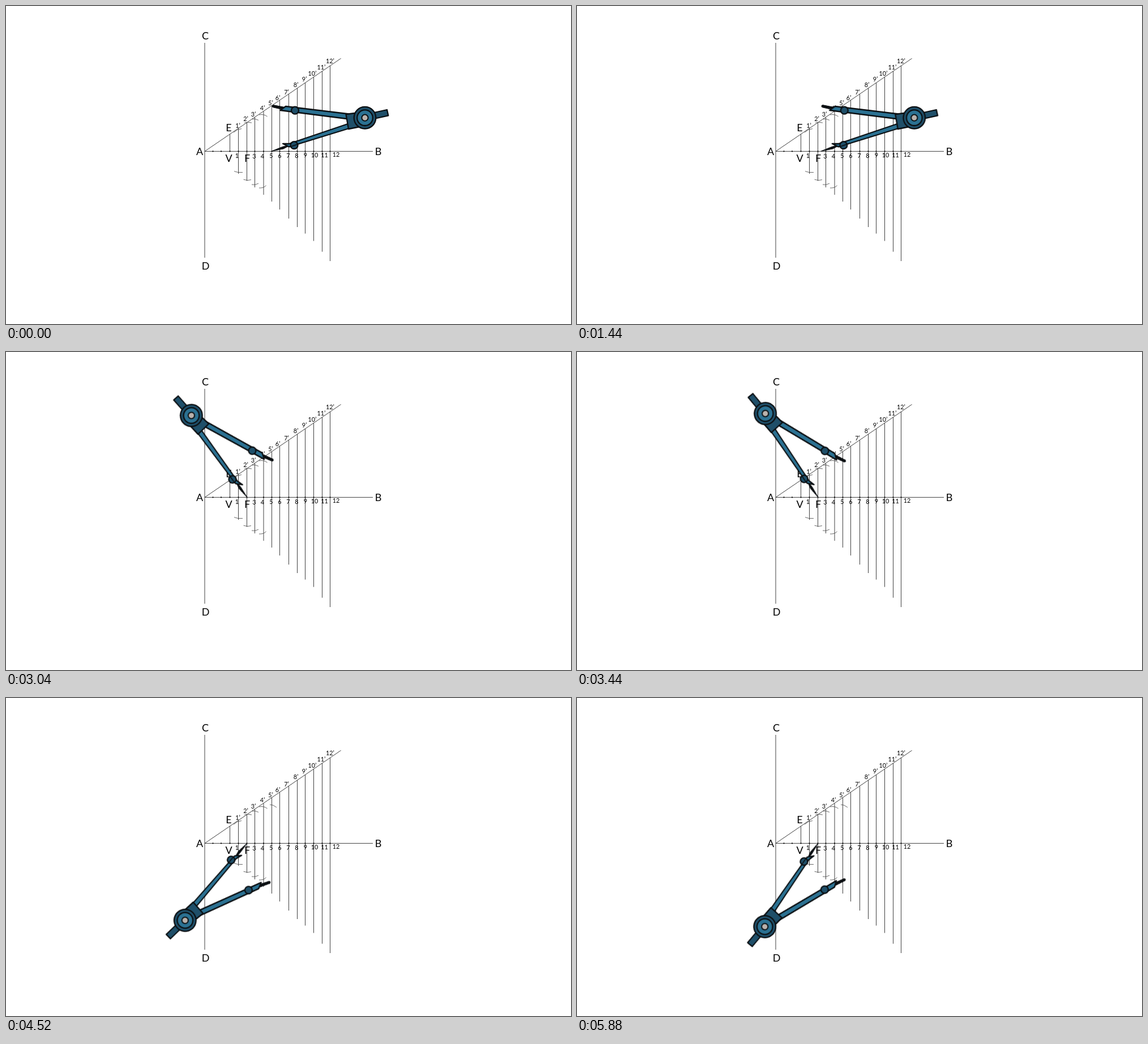
An HTML page for the animation above (5.92 s loop, 998 by 561 pixels).

```html
<!DOCTYPE html>
<html lang="en">
<head>
<meta charset="utf-8">
<title>Compass construction</title>
<style>
  html, body { margin: 0; width: 100%; height: 100%; overflow: hidden; background: #fff; }
  svg { display: block; width: 100vw; height: 100vh; }
  text { font-family: Lato, "Open Sans", sans-serif; text-anchor: middle; fill: #000; }
  .big { font-size: 18px; }
  .small { font-size: 10.8px; }
  .lines { fill: none; stroke: #2b2b2b; stroke-width: .9; }
  .arcs { fill: none; stroke: #444; stroke-width: .8; }

  #compass { stroke: #0b0f12; stroke-width: 2.3; stroke-linejoin: round; animation: move 5920ms linear infinite; }
  .dark { fill: #1f4f69; }
  .mid { fill: #2b7192; }
  .ink { fill: #0b0f12; stroke-width: 1; }
  #trace { animation: trace 5920ms step-end infinite; }

  /* slide to F, swing above the axis, swing below it */
  @keyframes move {
    0% { transform: translate(470px, 256px) scale(1, 1) rotate(0deg) scale(1, 1);
      animation-timing-function: cubic-bezier(.3333, 0, .6667, .3333); }
    16.554% { transform: translate(447.75px, 256px) scale(1, 1) rotate(0deg) scale(1, 1);
      animation-timing-function: cubic-bezier(.3333, .6667, .6667, 1); }
    33.108% { transform: translate(425.5px, 256px) scale(1, 1) rotate(0deg) scale(1, 1);
      animation-timing-function: step-end; }
    33.446% { transform: translate(425.5px, 256px) scale(1, 1) rotate(30.54deg) scale(-1, 1); }
    66.554% { transform: translate(425.5px, 256px) scale(1, 1) rotate(40.64deg) scale(-1, 1);
      animation-timing-function: step-end; }
    67.230% { transform: translate(425.5px, 256.5px) scale(1, -1) rotate(28.97deg) scale(-1, 1); }
    100% { transform: translate(425.5px, 256.5px) scale(1, -1) rotate(37.89deg) scale(-1, 1); }
  }
  @keyframes trace {
    0% { opacity: 0; }
    67.230%, 100% { opacity: 1; }
  }
</style>
</head>
<body>
<svg viewBox="0 0 998 561">
  <path class="lines" id="axes" d="M351 65V444M351 256.4H648M351 256.4L591.5 92.5M395.5 226V256"/>
  <path class="lines" id="bars"/>
  <g id="dots"/>
  <path class="arcs" d="M402 223Q408 217 416 216.5M421 206Q427 204.5 434 206M434 199.5Q440 198 446 201.5M447 192Q455 190 461.5 195
    M403 291.5Q409 294.5 418 293.5M419.5 306Q426 309 433 306.5M434 315Q440 316.5 446 313M447 321Q455 321.5 459.5 316.5"/>
  <path class="arcs" id="trace" d="M466 188Q472 188 478 193"/>
  <g id="labels"/>

  <g id="compass">
    <g transform="translate(-470 -256)">
      <path class="dark" d="M648 188.5L673 183L675.3 193.3L650 199Z"/>
      <path class="ink" d="M472 174.6L492 178.5L488 182.5L471 178.6Q468.5 176 472 174.6Z"/>
      <path class="mid" d="M484.5 184L494 177L606 190.5V199.5Z"/>
      <path class="ink" d="M469.5 256L488 248.5L506 243.5L490 252Z"/>
      <path class="mid" d="M489 242.8L500 243L608 206.5L609 215L500 248.5Z"/>
      <path class="dark" d="M600.5 191L624 188L630 212L605 217Z"/>
      <circle class="dark" cx="510.5" cy="184.2" r="6.5"/>
      <circle class="dark" cx="509" cy="245.7" r="6.5"/>
      <path d="M503 248L515 244" stroke-width="1.8"/>
      <circle class="dark" cx="634" cy="197.2" r="19.3"/>
      <circle class="mid" cx="634" cy="197.2" r="13.8"/>
      <circle cx="634" cy="197.2" r="5.6" fill="#b9b2ad" stroke-width="2"/>
    </g>
  </g>
</svg>
<script>
  const NS = 'http://www.w3.org/2000/svg';
  const $ = id => document.getElementById(id);

  function add(parent, tag, attrs, text) {
    const el = document.createElementNS(NS, tag);
    for (const key in attrs) el.setAttribute(key, attrs[key]);
    if (text) el.textContent = text;
    parent.appendChild(el);
  }

  // x, y is the middle of the capital or digit
  function label(text, x, y, size) {
    const drop = size === 'big' ? 6.5 : 3.9;
    add($('labels'), 'text', { class: size, x, y: y + drop }, text);
  }

  const barX = [410.5, 425.5, 439.5, 455, 469.5, 483.5, 499.5, 514.5, 528.5, 543.5, 558.5, 572.5];
  const barEnd = [296, 308.5, 320, 333, 345, 359, 375, 390, 401.5, 414.5, 433.5, 450];
  const slope = 163.9 / 240.5;
  $('bars').setAttribute('d', barX.map((x, i) =>
    `M${x} ${256.4 - (x - 351) * slope}V${barEnd[i]}`).join(''));

  for (const x of [365.5, 380, 395.5, ...barX])
    add($('dots'), 'circle', { cx: x, cy: 256.4, r: 1.1 });

  for (const [text, x, y] of [['A', 342, 256.5], ['B', 657.5, 256.5], ['C', 352, 52],
    ['D', 352.5, 458], ['E', 393.5, 214], ['V', 393.5, 268.5], ['F', 426, 268.5]])
    label(text, x, y, 'big');

  const upper = [[409.5, 211], [423.5, 199], [437, 191], [453, 180.5], [467.5, 171], [480, 162],
    [495.5, 152.5], [512, 139.5], [527, 129], [541, 119], [557, 108.5], [572.5, 96.7]];
  upper.forEach(([x, y], i) => label(i + 1 + '’', x, y, 'small'));

  const lower = [[408, 264], null, [438.5, 264.7], [453, 264.7], [468.5, 264.5], [483.5, 264.5],
    [498.5, 264.5], [513.5, 264.3], [529, 263.5], [545, 263.2], [562.5, 263.2], [583, 262.5]];
  lower.forEach((p, i) => p && label(String(i + 1), p[0], p[1], 'small'));
</script>
</body>
</html>
```
